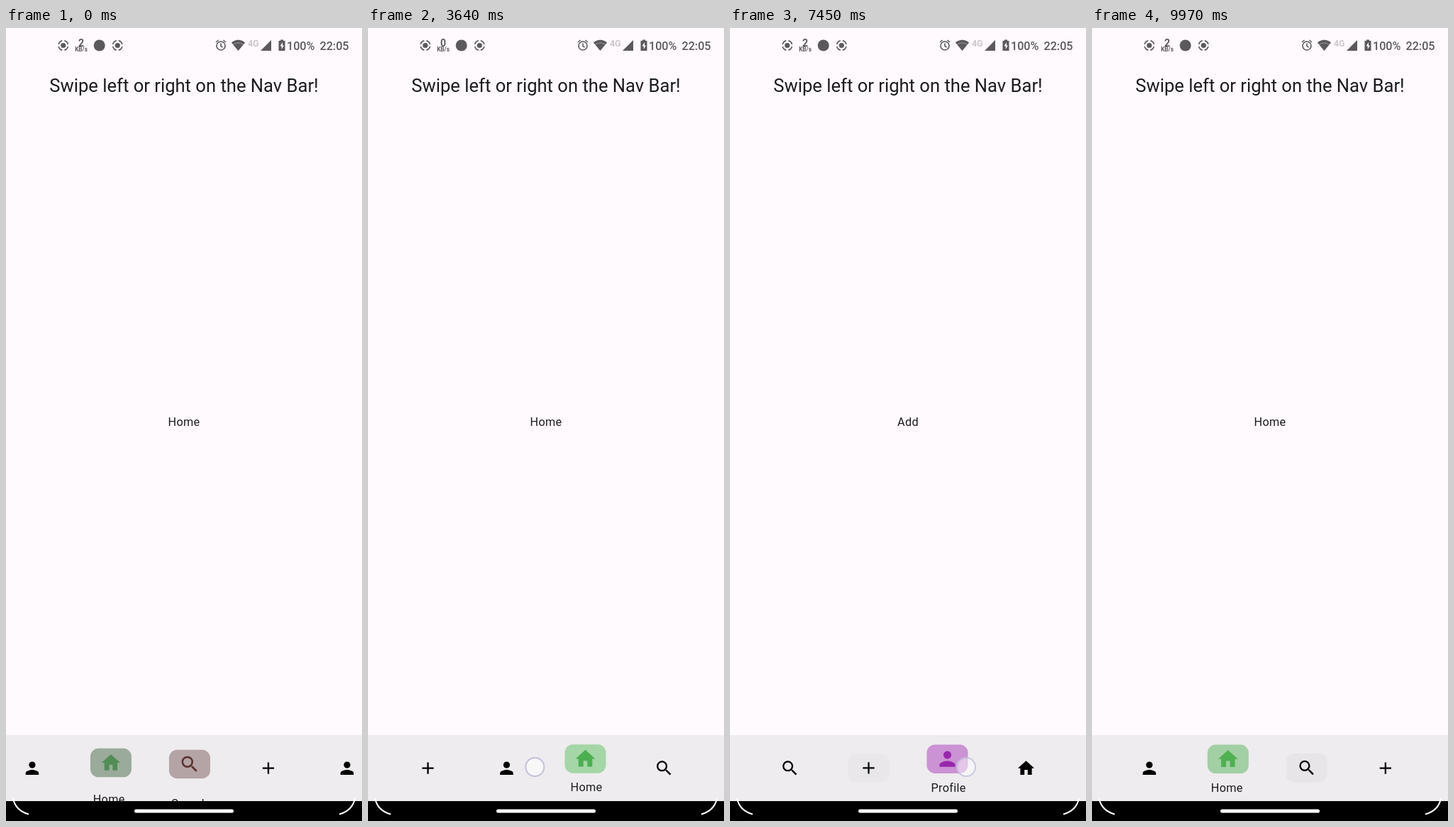
These frames come from a looping animation (502 by 1116 pixels, 10000 ms). An HTML page:

```html
<!DOCTYPE html>
<html lang="en">
<head>
<meta charset="utf-8">
<title>Swipe nav bar</title>
<style>
  html, body { margin: 0; width: 100%; height: 100%; overflow: hidden; background: #fffafe; }
  svg { display: block; width: 502px; height: 1116px; }
  text { font-family: Roboto, sans-serif; fill: #1c1b1f; text-anchor: middle; }
  .body { font-size: 16.27px; letter-spacing: .29px; }
  .status text { fill: #5c595d; font-weight: 500; font-size: 16.2px; }
  .status .rate { font-weight: 700; font-size: 14px; }
  .status .unit { font-weight: 700; font-size: 8.2px; }
  .status .net { font-weight: 700; font-size: 12.5px; fill: #cbc7cc; }
</style>
</head>
<body>
<svg viewBox="0 0 502 1116">
  <defs>
    <path id="home" d="M10 20v-6h4v6h5v-8h3L12 3 2 12h3v8z"/>
    <g id="search">
      <circle cx="9.5" cy="9.5" r="5.5" fill="none" stroke="currentColor" stroke-width="2"/>
      <path d="M14 13.3L14.7 14h.8l5 5-1.5 1.5-5-5v-.8l-.7-.7z"/>
    </g>
    <path id="add" d="M19 13h-6v6h-2v-6H5v-2h6V5h2v6h6z"/>
    <g id="profile">
      <circle cx="12" cy="8" r="4"/>
      <path d="M12 14c-2.67 0-8 1.34-8 4v2h16v-2c0-2.66-5.33-4-8-4z"/>
    </g>
    <g id="cast">
      <circle r="3.6"/>
      <circle r="6.8" fill="none" stroke="#5c595d" stroke-width="1.6" pathLength="40" stroke-dasharray="7 3" stroke-dashoffset="-1.5"/>
    </g>
  </defs>
  <rect width="502" height="1116" fill="#fffafe"/>

  <g class="status" fill="#5c595d">
    <use href="#cast" x="80.8" y="24.5"/>
    <text class="rate" id="rate" x="106" y="25.5">2</text>
    <text class="unit" x="106" y="33">KB/s</text>
    <circle cx="131.7" cy="24.5" r="8"/>
    <use href="#cast" x="157.3" y="24.5"/>
    <g fill="none" stroke="#5c595d" stroke-width="1.6">
      <circle cx="303" cy="25" r="6"/>
      <path d="M303 21.5v4l2.6 1.6M296 20l3.6-3M310 20l-3.6-3"/>
    </g>
    <path d="M318 20.5Q327.5 13 337 20.5L327.5 32z" fill="#bcb8bd"/>
    <path d="M318 20.5Q327.5 13 337 20.5L334.8 23.2Q327.5 18 320.2 23.2z"/>
    <path d="M320.6 23.7Q327.5 19 334.4 23.7L327.5 32z"/>
    <text class="net" x="348.8" y="26">4G</text>
    <path d="M374 17v15h-15z"/>
    <path d="M387 18v-1.5h4V18h2.5v14h-9V18z"/>
    <path d="M390 20l-3.5 5.5h2.2V30l3.3-5.6h-2z" fill="#fffafe"/>
    <text x="415.7" y="30.5">100%</text>
    <text x="463" y="30.5">22:05</text>
  </g>

  <text x="251" y="90" font-size="25.6">Swipe left or right on the Nav Bar!</text>
  <text class="body" id="page" x="251" y="560.3">Home</text>

  <rect y="995" width="502" height="94" fill="#eeecee"/>
  <g id="nav"></g>
  <circle id="touch" r="13" fill="#fff" fill-opacity=".6" stroke="#c3c0de" stroke-width="2"/>
  <rect y="1088" width="502" height="28"/>
  <rect x="181" y="1099.5" width="140" height="5" rx="2.5" fill="#fff"/>
  <g fill="none" stroke="#fff" stroke-width="2">
    <path d="M10 1084Q13 1101 32 1106.5"/>
    <path d="M492 1084Q489 1101 470 1106.5"/>
  </g>
</svg>
<script>
const LOOP = 10000, GAP = 111, SLOT = 195.5, REST_Y = 1041.7, LIFT = 13.3, DP = 1.162;
const HOME = 0, SEARCH = 1, ADD = 2, PROFILE = 3;

// name, icon colour, pill colour, label nudge
const items = [
  ["Home", [76, 175, 80], [165, 214, 167], 0],
  ["Search", [244, 67, 54], [239, 154, 154], 0],
  ["Add", [33, 150, 243], [144, 202, 249], -1],
  ["Profile", [156, 39, 176], [206, 147, 216], 0]
];

// start, duration, from, to, slots scrolled
const moves = [
  [-324, 600, SEARCH, HOME, 1],
  [880, 570, HOME, ADD, -1],
  [1850, 500, ADD, PROFILE, -1],
  [2760, 600, PROFILE, HOME, -1],
  [4010, 600, HOME, PROFILE, 0],
  [5240, 600, PROFILE, ADD, 1],
  [6186, 600, ADD, PROFILE, 0],
  [7390, 600, PROFILE, ADD, 0],
  [8370, 600, ADD, SEARCH, 1],
  [9448, 600, SEARCH, HOME, 1]
];

// down, up, x from, x to, y
const touches = [
  [760, 880, 330, 220, 1042],
  [1760, 1850, 330, 230, 1042],
  [2580, 2760, 340, 225, 1040],
  [3640, 4010, 235, 353, 1040],
  [4700, 5240, 235, 327, 1037],
  [5900, 6186, 412, 342, 1031],
  [7060, 7390, 230, 333, 1040],
  [8290, 8370, 310, 387, 1055],
  [9300, 9448, 250, 350, 1045]
];
const FADE = 300;

// time, KB/s
const rates = [[0, 2], [330, 0], [2330, 1], [3320, 0], [4310, 2], [5300, 0], [7290, 2], [8270, 1], [9270, 2]];

const $ = id => document.getElementById(id);
const clamp = v => Math.min(1, Math.max(0, v));
const mix = (a, b, u) => a + (b - a) * u;
const rgb = (c, k = 1) => `rgb(${c.map(v => Math.round(v * k))})`;

function easeInOut(x) {
  if (x <= 0 || x >= 1) return clamp(x);
  let lo = 0, hi = 1;
  for (let i = 0; i < 20; i++) {
    const u = (lo + hi) / 2, v = 1 - u;
    if (3 * v * v * u * .42 + 3 * v * u * u * .58 + u * u * u < x) lo = u; else hi = u;
  }
  return lo * lo * (3 - 2 * lo);
}

function node(tag, parent, attrs = {}) {
  const el = document.createElementNS("http://www.w3.org/2000/svg", tag);
  set(el, attrs);
  return parent.appendChild(el);
}
function set(el, attrs) {
  for (const k in attrs) el.setAttribute(k, attrs[k]);
}

// Each item appears twice, one lap apart, so the row wraps round.
const tabs = [];
items.forEach(([name, tint], id) => {
  for (const lap of [0, 4 * GAP]) {
    const g = node("g", $("nav"));
    const pill = node("rect", g, { x: -29, y: -20.25, width: 58, height: 40.5, rx: 11.6 });
    const icons = node("g", g);
    const icon = c => node("use", icons, { href: "#" + name.toLowerCase(), fill: c, color: c, x: -12, y: -12 });
    const under = icon("#000"), tinted = icon(rgb(tint)), over = icon("#000");
    const label = node("text", g, { class: "body" });
    label.textContent = name;
    tabs.push({ id, lap, g, pill, icons, under, tinted, over, label });
  }
});

function draw(t) {
  const level = [0, 0, 0, 0];
  let scroll = -GAP, page = HOME;
  for (const [start, dur, from, to, shift] of moves) {
    if (t < start) break;
    const e = easeInOut((t - start) / dur);
    level.fill(0);
    level[from] = 1 - e;
    level[to] = e;
    scroll += shift * GAP * e;
    page = to;
  }

  const lap = 4 * GAP;
  for (const tab of tabs) {
    const p = level[tab.id], [, , pillTint, nudge] = items[tab.id];
    const raw = SLOT + tab.id * GAP + scroll + 60;
    const x = ((raw % lap) + lap) % lap - 60 + tab.lap;
    const active = tab.id === page;
    set(tab.g, { transform: `translate(${x} ${REST_Y - LIFT * p})` });
    set(tab.pill, { fill: rgb(pillTint, p), "fill-opacity": p });
    set(tab.icons, { transform: `scale(${DP * (1 + .2 * p)})` });
    // the arriving icon lies on top during the cross-fade
    set(tab.under, { opacity: active ? 1 - p : 0 });
    set(tab.tinted, { opacity: p });
    set(tab.over, { opacity: active ? 0 : 1 - p });
    set(tab.label, { x: (x - 251) * .027 + nudge, y: 45.5 + (40 - LIFT) * (1 - p) });
  }

  $("page").textContent = items[page][0];
  $("rate").textContent = rates.filter(r => r[0] <= t).pop()[1];

  const touch = touches.find(([down, up]) => t >= down && t < up + FADE);
  set($("touch"), { opacity: 0 });
  if (touch) {
    const [down, up, x0, x1, y] = touch;
    set($("touch"), {
      cx: mix(x0, x1, clamp((t - down) / (up - down))),
      cy: y,
      opacity: 1 - clamp((t - up) / FADE)
    });
  }
}

const begin = performance.now();
function tick() {
  draw((performance.now() - begin) % LOOP);
  requestAnimationFrame(tick);
}
tick();
</script>
</body>
</html>
```
